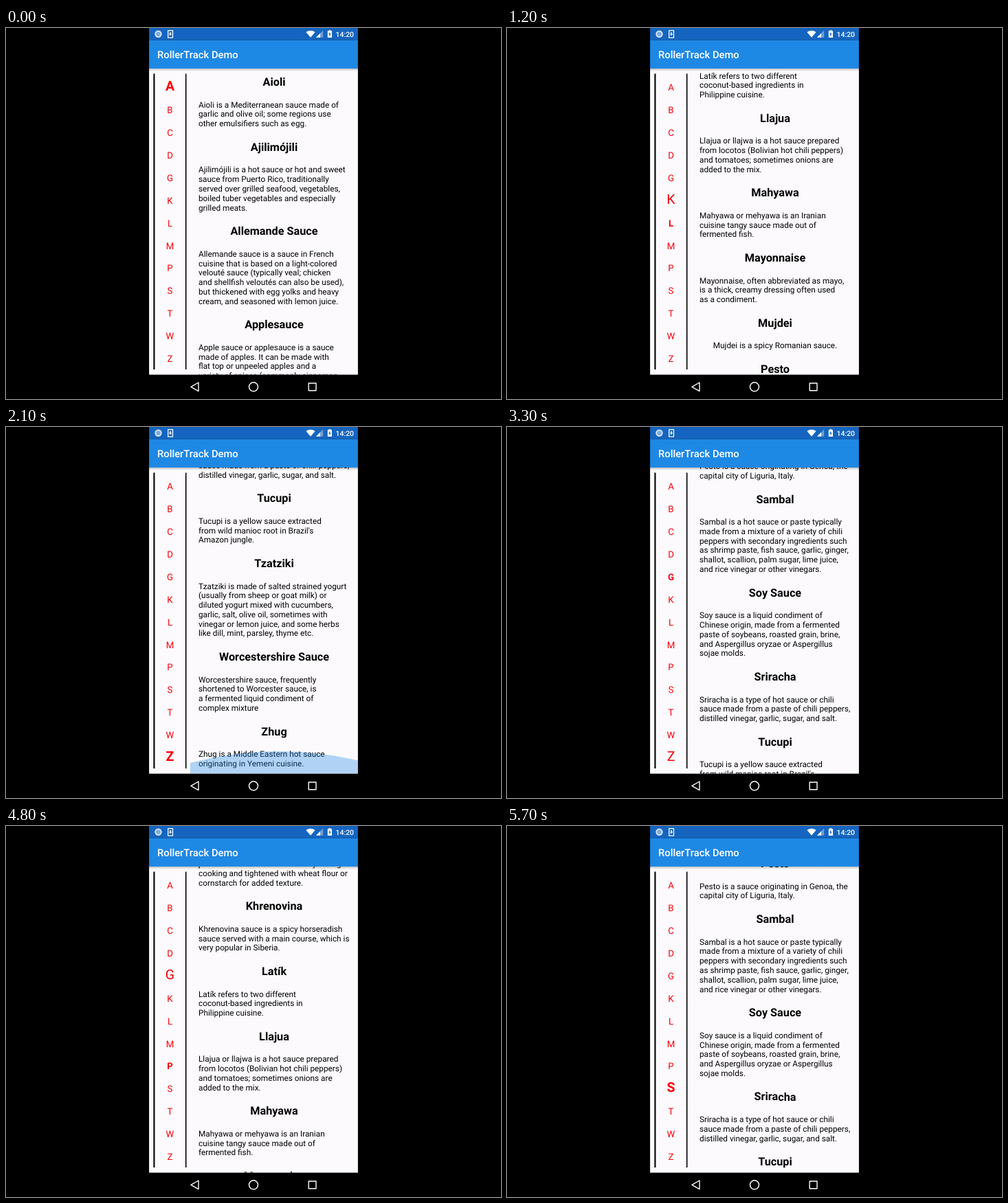
Animation of 720 by 540 pixels, one loop 5800 ms. Source, as an HTML page with a canvas:

```html
<!DOCTYPE html>
<html lang="en">
<head>
<meta charset="utf-8">
<style>
  html, body { margin: 0; width: 100%; height: 100%; overflow: hidden; background: #000; }
  canvas { display: block; }
</style>
</head>
<body>
<canvas id="stage" width="720" height="540"></canvas>
<script>
const ctx = document.getElementById('stage').getContext('2d');
const LOOP = 5800, STEP = 100;
const PX = 540 / 1920;                 // device pixel to stage pixel
const SCREEN = { left: 208.1, right: 511.9, width: 303.8, top: 59, bottom: 504.6 };
const LIST_LEFT = 268, LIST_MID = 390, LINE = 49 * PX;
const LETTERS = 'ABCDGKLMPSTWZ';
const PAPER = '#fcfafd', RED = '#f80008', BLUE = '#1e88e5';

const SAUCES = [
  ['Aioli', 'Aioli is a Mediterranean sauce made of|garlic and olive oil; some regions use|other emulsifiers such as egg.'],
  ['Ajilimójili', 'Ajilimójili is a hot sauce or hot and sweet|sauce from Puerto Rico, traditionally|served over grilled seafood, vegetables,|boiled tuber vegetables and especially|grilled meats.'],
  ['Allemande Sauce', 'Allemande sauce is a sauce in French|cuisine that is based on a light-colored|velouté sauce (typically veal; chicken|and shellfish veloutés can also be used),|but thickened with egg yolks and heavy|cream, and seasoned with lemon juice.'],
  ['Applesauce', 'Apple sauce or applesauce is a sauce|made of apples. It can be made with|flat top or unpeeled apples and a|variety of spices (commonly cinnamon|and allspice).'],
  ['Bolognese', 'Bolognese sauce is a meat-based sauce|originating from Bologna.'],
  ['Béchamel', 'Béchamel sauce, also known as white|sauce, is made from a white roux (butter|and flour) and milk.'],
  ['Caruso Sauce', 'Caruso Sauce or Salsa Caruso is a warm|sauce made of cream, ham, cheese, nuts|and mushrooms.'],
  ['Chimichurri', 'Chimichurri is an uncooked sauce used|for grilled meat, made of parsley, garlic,|olive oil, oregano and vinegar. It comes|from Argentina and Uruguay.'],
  ['Demi-glace', 'Demi-glace is a rich brown sauce in|French cuisine used by itself or as a|base for other sauces.'],
  ['Garum', 'Garum was a fermented fish sauce|used as a condiment[1] in the cuisines|of ancient Greece, Rome, and later|Byzantium.'],
  ['Gravy', 'Gravy is a sauce often made from the|juices of meats that run naturally during|cooking and tightened with wheat flour or|cornstarch for added texture.'],
  ['Khrenovina', 'Khrenovina sauce is a spicy horseradish|sauce served with a main course, which is|very popular in Siberia.'],
  ['Latík', 'Latík refers to two different|coconut-based ingredients in|Philippine cuisine.'],
  ['Llajua', 'Llajua or llajwa is a hot sauce prepared|from locotos (Bolivian hot chili peppers)|and tomatoes; sometimes onions are|added to the mix.'],
  ['Mahyawa', 'Mahyawa or mehyawa is an Iranian|cuisine tangy sauce made out of|fermented fish.'],
  ['Mayonnaise', 'Mayonnaise, often abbreviated as mayo,|is a thick, creamy dressing often used|as a condiment.'],
  ['Mujdei', 'Mujdei is a spicy Romanian sauce.'],
  ['Pesto', 'Pesto is a sauce originating in Genoa, the|capital city of Liguria, Italy.'],
  ['Sambal', 'Sambal is a hot sauce or paste typically|made from a mixture of a variety of chili|peppers with secondary ingredients such|as shrimp paste, fish sauce, garlic, ginger,|shallot, scallion, palm sugar, lime juice,|and rice vinegar or other vinegars.'],
  ['Soy Sauce', 'Soy sauce is a liquid condiment of|Chinese origin, made from a fermented|paste of soybeans, roasted grain, brine,|and Aspergillus oryzae or Aspergillus|sojae molds.'],
  ['Sriracha', 'Sriracha is a type of hot sauce or chili|sauce made from a paste of chili peppers,|distilled vinegar, garlic, sugar, and salt.'],
  ['Tucupi', "Tucupi is a yellow sauce extracted|from wild manioc root in Brazil's|Amazon jungle."],
  ['Tzatziki', 'Tzatziki is made of salted strained yogurt|(usually from sheep or goat milk) or|diluted yogurt mixed with cucumbers,|garlic, salt, olive oil, sometimes with|vinegar or lemon juice, and some herbs|like dill, mint, parsley, thyme etc.'],
  ['Worcestershire Sauce', 'Worcestershire sauce, frequently|shortened to Worcester sauce, is|a fermented liquid condiment of|complex mixture'],
  ['Zhug', 'Zhug is a Middle Eastern hot sauce|originating in Yemeni cuisine.']
];

let total = 0;
const items = SAUCES.map(([title, text]) => {
  const lines = text.split('|');
  const item = { title, lines, top: total };
  total += 190 * PX + lines.length * LINE;
  return item;
});
const topOf = title => items.find(item => item.title === title).top;
const END = total - (SCREEN.bottom - SCREEN.top);
const GARUM = topOf('Garum');

// [time, scroll offset, easing power towards this point]
const SCROLL = [
  [0, 0, 1], [200, 0, 1], [500, 288, 1], [1200, GARUM + 354, 1], [2000, END, 1],
  [3200, END, 1], [3700, GARUM, 1.6], [4700, GARUM, 1], [5100, GARUM + 716, 1],
  [5300, topOf('Pesto'), 2], [5500, topOf('Pesto'), 1], [5700, GARUM + 796, 1]
];
const TAPS = [[5400, 'S'], [4800, 'P'], [3300, 'G'], [2000, 'Z']];

function scrollAt(t) {
  const i = SCROLL.findIndex(key => key[0] >= t);
  if (i <= 0) return 0;
  const [t0, from] = SCROLL[i - 1], [t1, to, power] = SCROLL[i];
  return from + (to - from) * (1 - (1 - (t - t0) / (t1 - t0)) ** power);
}

function selectedAt(t) {
  const tap = TAPS.find(([time]) => t >= time);
  if (tap) return tap[1];
  const offset = scrollAt(t) - 1;
  return items.find(item => item.top >= offset).title[0];
}

function rect(color, x, y, w, h) {
  ctx.fillStyle = color;
  ctx.fillRect(x, y, w, h);
}

function shape(color, ...points) {
  ctx.fillStyle = color;
  ctx.beginPath();
  points.forEach(([x, y]) => ctx.lineTo(x, y));
  ctx.closePath();
  ctx.fill();
}

function disc(color, x, y, r) {
  ctx.fillStyle = color;
  ctx.beginPath();
  ctx.arc(x, y, r, 0, 2 * Math.PI);
  ctx.fill();
}

// An imperceptible skew keeps glyphs unhinted and on fractional baselines.
function label(text, x, y, size, weight, color, align) {
  ctx.save();
  ctx.transform(1, 1e-4, 0, 1, x, y);
  ctx.font = `${weight} ${size}px Roboto, sans-serif`;
  ctx.textRendering = 'geometricPrecision';
  ctx.fillStyle = color;
  ctx.textAlign = align;
  ctx.fillText(text, 0, 0);
  ctx.restore();
}

function drawList(offset) {
  for (const { title, lines, top } of items) {
    const y = SCREEN.top + top - offset;
    if (y > SCREEN.bottom || y < SCREEN.top - 160) continue;
    label(title, LIST_MID, y + 25, 16.24, 700, '#000', 'center');
    const single = lines.length === 1;
    lines.forEach((line, i) => label(line, single ? LIST_MID : 280,
      y + 56.6 + i * LINE, 11.81, 400, '#000', single ? 'center' : 'left'));
  }
}

function drawGlow(t) {
  if (t < 2000 || t >= 2700) return;
  const power = t < 2100 ? 0.7 : (2700 - t) / 600;
  ctx.globalAlpha = 0.34 * Math.min(1, power * 1.2);
  disc(BLUE, 397, SCREEN.bottom - 32.5 * power + 500, 500);
  ctx.globalAlpha = 1;
}

function drawTrack(t) {
  rect('#000', 214.4, 66.5, 2.1, 430.5);
  rect('#000', 260.9, 66.5, 1.6, 430.5);
  const bold = selectedAt(t);
  const large = selectedAt(Math.max(0, t - STEP)); // size follows weight one beat later
  [...LETTERS].forEach((letter, i) => label(letter, 238.5, 91.1 + i * 32.92,
    letter === large ? 19.6 : 13.3, letter === bold ? 700 : 400, RED, 'center'));
}

function drawBars() {
  rect('#1565c0', SCREEN.left, 0, SCREEN.width, 17.7);
  rect(BLUE, SCREEN.left, 17.7, SCREEN.width, 41.3);
  const shadow = ctx.createLinearGradient(0, 59, 0, 63);
  shadow.addColorStop(0, 'rgba(0,0,0,.24)');
  shadow.addColorStop(1, 'rgba(0,0,0,0)');
  rect(shadow, SCREEN.left, 59, SCREEN.width, 4);
  label('RollerTrack Demo', 220, 44.2, 14.77, 500, '#fff', 'left');
  label('14:20', 506, 12.8, 10.4, 500, '#fff', 'right');
}

function drawStatusIcons() {
  disc('#d6e4f4', 221.5, 8.8, 5.2);
  disc('#7fabdf', 221.5, 8.8, 3.2);
  ctx.strokeStyle = '#fff';
  ctx.lineWidth = 1.3;
  ctx.strokeRect(235.7, 3.7, 6.8, 10.4);
  rect('#fff', 238.4, 6, 1.4, 3);
  shape('#fff', [236.8, 8.5], [241.4, 8.5], [239.1, 11.2]);

  ctx.fillStyle = '#fff';
  ctx.beginPath();
  ctx.moveTo(443, 13.8);
  ctx.lineTo(436.4, 6);
  ctx.quadraticCurveTo(443, 1.4, 449.6, 6);
  ctx.fill();
  shape('#6f9fd8', [451, 13.8], [461.2, 13.8], [461.2, 3.6]);
  shape('#fff', [451, 13.8], [457, 13.8], [457, 7.8]);

  rect('#fff', 467.8, 4.2, 6.2, 9.8);
  rect('#fff', 469.4, 3.2, 3, 1.2);
  shape('#1565c0', [471.5, 5.6], [469, 9.6], [470.6, 9.6], [470.3, 12.6], [472.8, 8.6], [471.2, 8.6]);
}

function drawNavigation() {
  ctx.strokeStyle = '#fff';
  ctx.lineWidth = 1.4;
  ctx.lineJoin = 'round';
  ctx.beginPath();
  ctx.moveTo(269, 522.3);
  ctx.lineTo(280, 516);
  ctx.lineTo(280, 528.6);
  ctx.closePath();
  ctx.stroke();
  ctx.beginPath();
  ctx.arc(360, 522.3, 6.5, 0, 2 * Math.PI);
  ctx.stroke();
  ctx.strokeRect(440.2, 517, 10.8, 10.8);
}

function draw(t) {
  rect('#000', 0, 0, 720, 540);
  rect(PAPER, SCREEN.left, SCREEN.top, SCREEN.width, SCREEN.bottom - SCREEN.top);
  ctx.save();
  ctx.beginPath();
  ctx.rect(LIST_LEFT, SCREEN.top, SCREEN.right - LIST_LEFT, SCREEN.bottom - SCREEN.top);
  ctx.clip();
  drawList(scrollAt(t));
  drawGlow(t);
  ctx.restore();
  drawTrack(t);
  drawBars();
  drawStatusIcons();
  drawNavigation();
}

const start = performance.now();
function tick() {
  const t = (performance.now() - start) % LOOP;
  draw(Math.floor(t / STEP) * STEP);
  requestAnimationFrame(tick);
}
tick();
</script>
</body>
</html>
```
